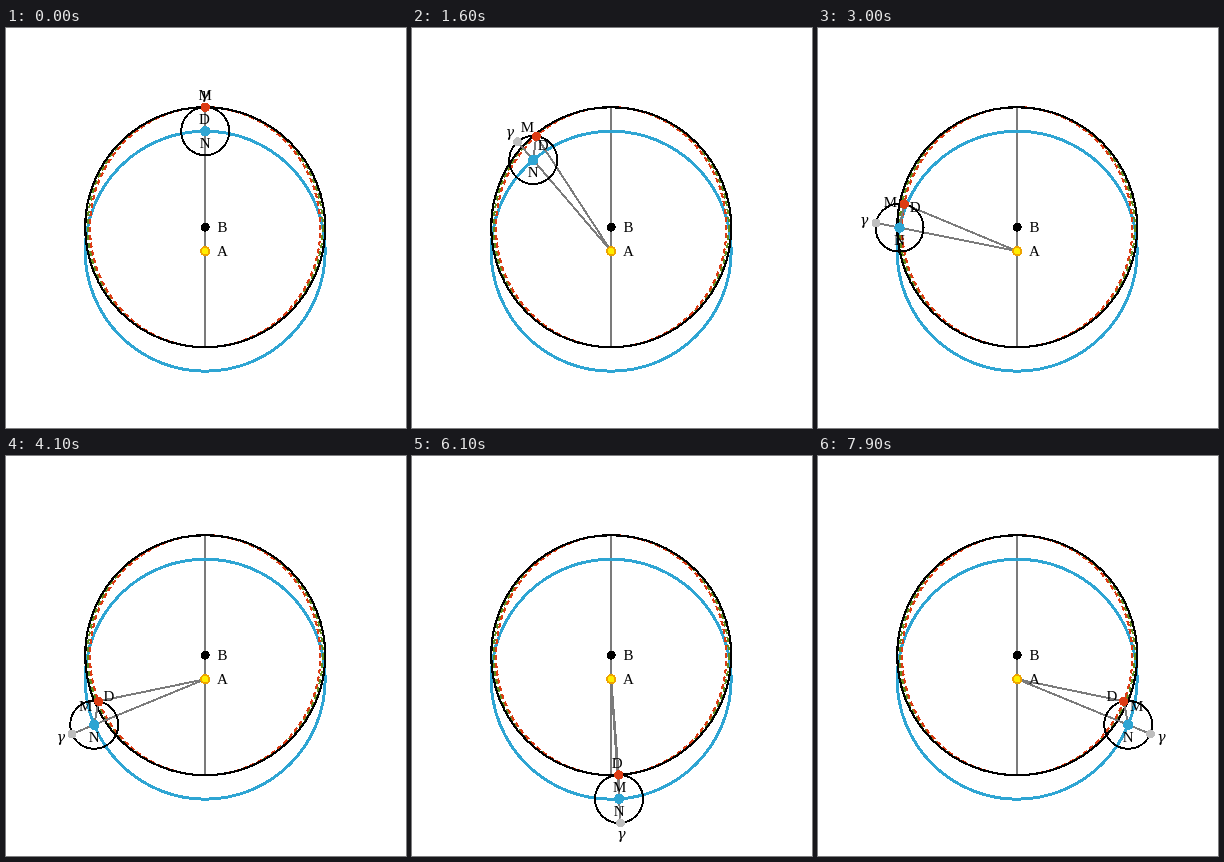
Animation, 400 px wide and 400 px high, one loop 8 s. Source, as an HTML page:

```html
<!DOCTYPE html>
<html lang="en">
<head>
<meta charset="utf-8">
<title>Epicycle model</title>
<style>
  html, body { margin: 0; width: 100%; height: 100%; overflow: hidden; background: #fff; }
  svg { display: block; width: 400px; height: 400px; }
  text { font: 15px "Liberation Serif", "Times New Roman", serif; text-anchor: middle; }
  text.greek { font: italic 14px "DejaVu Serif", serif; }
  .shapes { fill: none; shape-rendering: crispEdges; }
</style>
</head>
<body>
<svg viewBox="0 0 400 400">
  <g class="shapes" id="shapes"></g>
  <g id="labels"></g>
</svg>
<script>
const STEP = 100, STEPS = 80, STEPS_PER_TURN = 120;
const R = 120, r = 24;
const A = { x: 199.2, y: 223.2 };
const B = { x: 199.2, y: 199.2 };
const shapes = document.getElementById('shapes');
const labels = document.getElementById('labels');

function set(node, attrs) {
  for (const key in attrs) node.setAttribute(key, attrs[key]);
  return node;
}

function add(parent, tag, attrs) {
  const node = document.createElementNS('http://www.w3.org/2000/svg', tag);
  return parent.appendChild(set(node, attrs));
}

// Angles run counterclockwise from straight up.
const polar = (c, radius, angle) => ({
  x: c.x - radius * Math.sin(angle),
  y: c.y - radius * Math.cos(angle)
});

function pose(mean) {
  const seen = Math.atan2(Math.sin(mean), Math.cos(mean) + r / R);
  const N = polar(A, R, seen);
  return { N, M: polar(N, r, seen - mean), G: polar(N, r, seen) };
}

const ring = (c, radius, stroke, width) =>
  add(shapes, 'circle', { cx: c.x, cy: c.y, r: radius, stroke, 'stroke-width': width });

const dot = (c, radius, fill) =>
  add(shapes, 'circle', { cx: c.x, cy: c.y, r: radius, fill });

const line = (a, b) => place(add(shapes, 'line', { stroke: '#7b7b7b', 'stroke-width': 2 }), a, b);

function place(node, a, b) {
  return set(node, { x1: a.x, y1: a.y, x2: b.x, y2: b.y });
}

function label(text, x, y, cls = '') {
  const node = add(labels, 'text', { x, y, class: cls });
  node.textContent = text;
  return node;
}

function orbitPath() {
  const points = [];
  for (let i = 0; i < 240; i++) {
    const { M } = pose(i / 240 * 2 * Math.PI);
    points.push(M.x.toFixed(2) + ' ' + M.y.toFixed(2));
  }
  return 'M' + points.join('L') + 'Z';
}

// Fixed curves
line({ x: B.x, y: B.y - R }, { x: B.x, y: B.y + R });
ring(A, R, '#2ea5d3', 3);
add(shapes, 'ellipse', {
  cx: B.x, cy: B.y, rx: Math.sqrt(R * R - r * r), ry: R,
  stroke: '#5f8c1e', 'stroke-width': 2, 'stroke-dasharray': '5 3'
});
add(shapes, 'path', { d: orbitPath(), stroke: '#dc3c14', 'stroke-width': 2.2, 'stroke-dasharray': '5 3' });
ring(B, R, '#000', 2.2);

// Moving parts
const lineG = line(A, A), lineM = line(A, A), lineNM = line(A, A);
const epicycle = ring(A, r, '#000', 2);
const dotG = dot(A, 4.5, '#bebebe');
const dotN = dot(A, 5.2, '#2ea5d3');
const dotM = dot(A, 4.7, '#dc3c14');

dot(B, 4.5, '#000');
set(dot(A, 4.2, '#ffee00'), { stroke: '#eea300', 'stroke-width': 1.8 });
label('A', A.x + 17.3, A.y + 5);
label('B', B.x + 17.3, B.y + 5);
const textN = label('N'), textD = label('D'), textM = label('M');
const textG = label('γ', 0, 0, 'greek');

function draw(step) {
  const { N, M, G } = pose(step / STEPS_PER_TURN * 2 * Math.PI);
  place(lineG, A, G);
  place(lineM, A, M);
  place(lineNM, N, M);
  for (const [node, p] of [[epicycle, N], [dotG, G], [dotN, N], [dotM, M]])
    set(node, { cx: p.x, cy: p.y });

  const d = Math.hypot(M.x - B.x, M.y - B.y);
  const out = { x: (M.x - B.x) / d, y: (M.y - B.y) / d };
  const far = { x: (G.x - A.x) / (R + r), y: (G.y - A.y) / (R + r) };
  set(textN, { x: N.x, y: N.y + 17 });
  set(textD, { x: M.x - 12 * out.x - 0.7, y: M.y - 12 * out.y + 5 });
  set(textM, { x: M.x + 14 * out.x, y: M.y + 12 * out.y + 5 });
  set(textG, { x: G.x + 12 * far.x, y: G.y + 12 * far.y + 4 });
}

const start = performance.now();
let shown = -1;

function tick() {
  const step = Math.floor((performance.now() - start) / STEP) % STEPS;
  if (step !== shown) draw(shown = step);
  requestAnimationFrame(tick);
}
tick();
</script>
</body>
</html>
```
